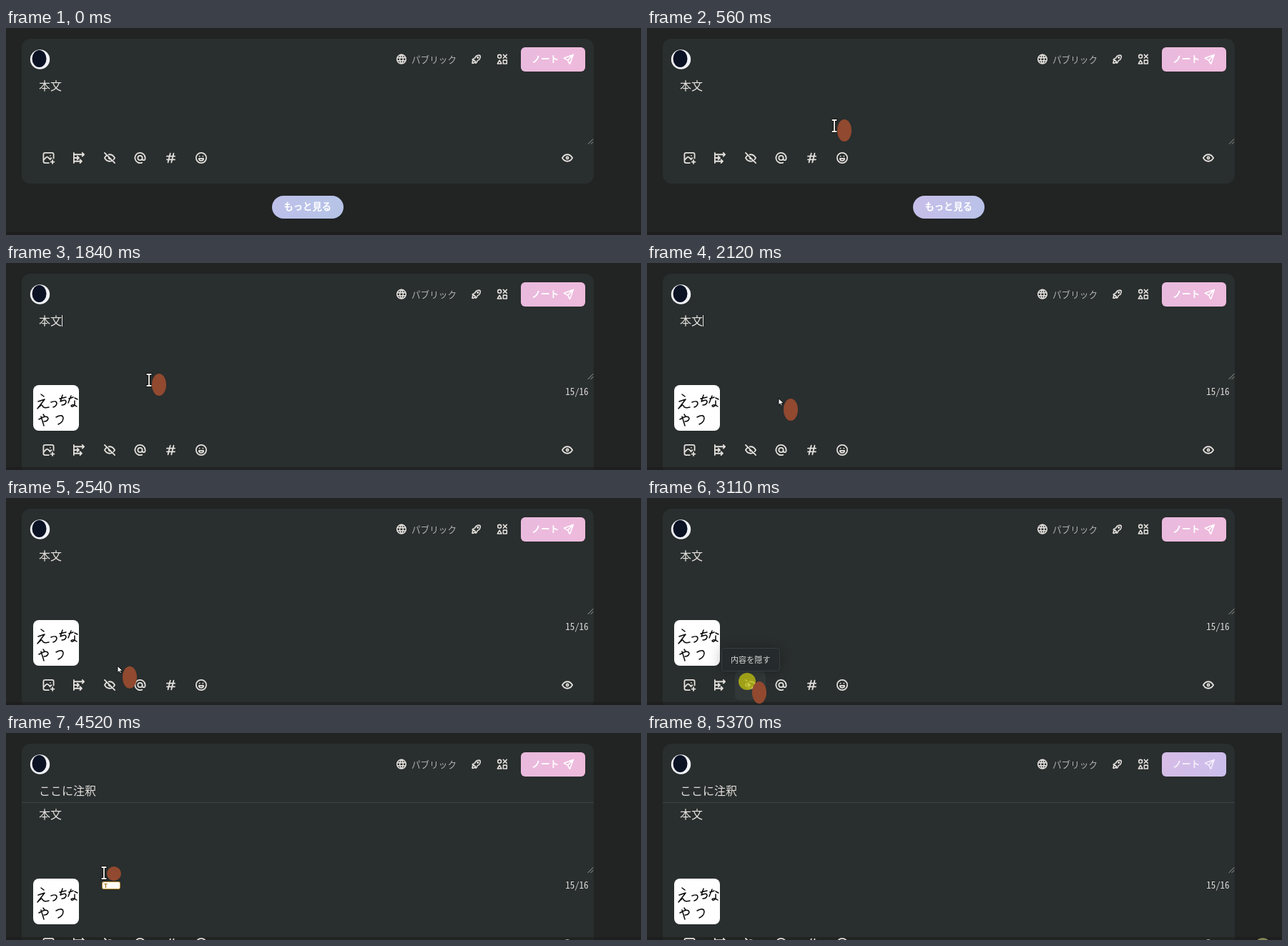
An HTML page with a canvas that plays this animation: 888x290 px, repeating every 5510 ms.

```html
<!DOCTYPE html>
<html lang="ja">
<head>
<meta charset="utf-8">
<title>投稿フォーム</title>
<style>
html, body { margin: 0; width: 888px; height: 290px; overflow: hidden; background: #212423; }
canvas { display: block; }
</style>
</head>
<body>
<canvas id="stage" width="888" height="290"></canvas>
<script>
const ctx = document.getElementById('stage').getContext('2d');
const LOOP = 5510, STEPS = 39;
const SANS = '"Noto Sans CJK JP", "Noto Sans CJK", "Noto Sans", sans-serif';
const MONO = '"Noto Sans Mono CJK JP", "Noto Sans CJK JP", "Noto Sans Mono", monospace';
const INK = '#e4e1dd';

// Steps at which the form changes
const FOCUS = 5, ATTACH = 12, BLUR = 19, HOVER = 20, CLICK = 22, WARN = 23;

// Pointer keys: step, x, y
const route = [
  [1, 680, 292], [2, 619, 235], [3, 410, 165], [4, 262, 128], [5, 219, 118],
  [11, 219, 118], [13, 200, 155], [15, 184, 190], [17, 164, 225], [20, 140, 257],
  [28, 140, 257], [30, 137, 222], [32, 137, 187], [33, 140, 190], [34, 300, 208],
  [35, 590, 238], [36, 750, 250], [37, 852, 284], [38, 861, 299]
];

const mix = (a, b, k) => a + (b - a) * k;
const clamp = v => Math.max(0, Math.min(1, v));
const rgb = (a, b, k) => `rgb(${a.map((v, i) => Math.round(mix(v, b[i], k)))})`;

function box(x, y, w, h, r, fill, stroke) {
  ctx.beginPath();
  ctx.roundRect(x, y, w, h, r);
  if (fill) { ctx.fillStyle = fill; ctx.fill(); }
  if (stroke) { ctx.strokeStyle = stroke; ctx.lineWidth = 1; ctx.stroke(); }
}

function disc(x, y, r, fill) {
  ctx.beginPath();
  ctx.arc(x, y, r, 0, Math.PI * 2);
  ctx.fillStyle = fill;
  ctx.fill();
}

function label(str, x, y, size, color = INK, weight = 500, family = SANS) {
  ctx.font = `${weight} ${size}px ${family}`;
  ctx.textBaseline = 'alphabetic';
  ctx.fillStyle = color;
  ctx.fillText(str, x, y);
}

function icon(d, x, y, scale, color = INK) {
  ctx.save();
  ctx.translate(x, y);
  ctx.scale(scale, scale);
  ctx.translate(-12, -12);
  ctx.lineWidth = 2.25;
  ctx.lineCap = ctx.lineJoin = 'round';
  ctx.strokeStyle = color;
  ctx.stroke(new Path2D(d));
  ctx.restore();
}

function button(x, y, w, h, r, left, right) {
  const g = ctx.createLinearGradient(x, y, x + w, y + h);
  g.addColorStop(0, left);
  g.addColorStop(1, right);
  box(x, y, w, h, r, g);
}

const RING = 'M3 12a9 9 0 1 0 18 0a9 9 0 1 0 -18 0';

function header(step) {
  disc(47.5, 44, 13.7, '#f1f3f8');
  ctx.beginPath();
  ctx.ellipse(46.5, 43, 10, 12, 0, 0, Math.PI * 2);
  ctx.fillStyle = '#0b1224';
  ctx.fill();

  icon(RING + 'M3.6 9h16.8M3.6 15h16.8M11.5 3a17 17 0 0 0 0 18M12.5 3a17 17 0 0 1 0 18', 553, 43.7, .7);
  label('パブリック', 567, 48.5, 12.6, '#b0b2b0');
  icon('M4 13a8 8 0 0 1 7 7a6 6 0 0 0 3 -5a9 9 0 0 0 6 -8a3 3 0 0 0 -3 -3a9 9 0 0 0 -8 6a6 6 0 0 0 -5 3' +
    'M7 14a6 6 0 0 0 -3 6a6 6 0 0 0 6 -3M14 9a1 1 0 1 0 2 0a1 1 0 1 0 -2 0', 657.7, 43.7, .7);
  icon('M3 6.5a3.5 3.5 0 1 0 7 0a3.5 3.5 0 1 0 -7 0M2.5 21h8l-4 -7zM14 3l7 7M14 10l7 -7M14 14h7v7h-7z', 694, 43.7, .7);

  const k = clamp((step - 32) / 6);
  button(720, 27, 90, 34, 6, rgb([233, 186, 222], [215, 188, 230], k), rgb([239, 186, 220], [202, 190, 236], k));
  const ink = `rgba(255,255,255,${mix(1, .75, k)})`;
  label('ノート', 735, 48.2, 12.8, ink, 700);
  icon('M10 14l11 -11M21 3l-6.5 18a.55 .55 0 0 1 -1 0l-3.5 -7l-7 -3.5a.55 .55 0 0 1 0 -1l18 -6.5', 787, 43.7, .7, ink);
}

function toolbar(y) {
  const s = .79;
  icon('M15 8h.01M12.5 21h-6.5a3 3 0 0 1 -3 -3v-12a3 3 0 0 1 3 -3h12a3 3 0 0 1 3 3v6.5' +
    'M3 16l5 -5c.9 -.9 2.1 -.9 3 0l4 4M14 14l1 -1c.7 -.6 1.4 -.8 2.2 -.5M16 19h6M19 16v6', 59.5, y, s);
  icon('M3 18h14M9 9l3 3l-3 3M14 15l3 3l-3 3M3 3v18M3 12h9M18 3l3 3l-3 3M3 6h18', 102, y, s);
  icon('M10.6 10.6a2 2 0 0 0 2.8 2.8M16.7 16.7a8.7 8.7 0 0 1 -4.7 1.3c-3.6 0 -6.6 -2 -9 -6c1.3 -2.1 2.7 -3.7 4.3 -4.7' +
    'm2.9 -1.1a9 9 0 0 1 1.8 -.2c3.6 0 6.6 2 9 6c-.7 1.1 -1.4 2 -2.1 2.9M3 3l18 18', 145, y, s);
  icon('M8 12a4 4 0 1 0 8 0a4 4 0 1 0 -8 0M16 12v1.5a2.5 2.5 0 0 0 5 0v-1.5a9 9 0 1 0 -5.5 8.3', 187.5, y, s);
  icon('M5 9h14M5 15h14M11 4l-4 16M17 4l-4 16', 230.5, y, s);
  icon(RING + 'M9 9h.01M15 9h.01M8 13a4 4 0 1 0 8 0h-8', 273, y, s);
  icon('M10 12a2 2 0 1 0 4 0a2 2 0 0 0 -4 0M21 12c-2.4 4 -5.4 6 -9 6c-3.6 0 -6.6 -2 -9 -6c2.4 -4 5.4 -6 9 -6c3.6 0 6.6 2 9 6', 785, y, s);
}

// Handwritten memo
const strokes = [
  'M11 13l4 3M7 23l9 -3l-10 13q6 -7 7 -4q1 4 9 2',
  'M25 24q8 -3 8 2q-1 4 -5 5',
  'M37 19l9 -2M41 14l-3 9q8 -4 8 1q-1 4 -6 4',
  'M50 19l6 -2M53 15l-4 10M58 18l4 2M58 22v6q-4 4 -5 1q2 -3 8 1',
  'M8 48q12 -7 13 -1q-1 4 -6 4M14 41l2 3M11 44l4 13',
  'M32 45q9 -5 10 1q0 6 -7 9'
].map(d => new Path2D(d));

function thumb(y) {
  box(38, y, 64, 64, 8, '#fff');
  ctx.save();
  ctx.translate(38, y);
  ctx.strokeStyle = '#080808';
  ctx.lineWidth = 1.5;
  ctx.lineCap = ctx.lineJoin = 'round';
  strokes.forEach(p => ctx.stroke(p));
  ctx.restore();
  ctx.textAlign = 'right';
  label('15/16', 814.5, y + 13.5, 12.9, '#e0dedb', 500, MONO);
  ctx.textAlign = 'left';
}

function grip(y) {
  ctx.strokeStyle = '#a0a2a1';
  ctx.lineWidth = 1;
  ctx.beginPath();
  ctx.moveTo(814, y + 7); ctx.lineTo(821, y);
  ctx.moveTo(818, y + 7); ctx.lineTo(821, y + 4);
  ctx.stroke();
}

function tooltip() {
  ctx.save();
  ctx.shadowColor = 'rgba(0,0,0,.3)';
  ctx.shadowBlur = 18;
  box(104.5, 210.5, 81, 32, 4, '#252b2d');
  ctx.restore();
  box(104.5, 210.5, 81, 32, 4, null, '#363d3f');
  label('内容を隠す', 117, 230.5, 11.1, '#d8d9d8');
}

function pointerAt(step) {
  const i = route.findIndex(p => p[0] >= step);
  if (i < 0 || step < route[0][0]) return null;
  if (i === 0) return { x: route[0][1], y: route[0][2] };
  const [a, ax, ay] = route[i - 1], [b, bx, by] = route[i];
  const k = (step - a) / (b - a);
  return { x: mix(ax, bx, k), y: mix(ay, by, k) };
}

function beam(x, y) {
  const p = new Path2D(`M${x - 2.5} ${y + 1}h5M${x} ${y + 1}v16M${x - 2.5} ${y + 17}h5`);
  ctx.lineCap = 'square';
  for (const [w, c] of [[3.8, '#111'], [1.8, '#f4f1ea']]) {
    ctx.lineWidth = w;
    ctx.strokeStyle = c;
    ctx.stroke(p);
  }
}

function arrow(x, y) {
  const p = new Path2D(`M${x} ${y}v9l2.2 -2l1.6 3.2l1.6 -.8l-1.5 -3h3z`);
  ctx.lineWidth = 1;
  ctx.lineJoin = 'miter';
  ctx.fillStyle = '#fff';
  ctx.strokeStyle = '#111';
  ctx.fill(p);
  ctx.stroke(p);
}

function companion(x, y, sign) {
  ctx.beginPath();
  ctx.ellipse(x, y + (sign ? 10 : 15.5), 10, sign ? 10 : 15.5, 0, 0, Math.PI * 2);
  ctx.fillStyle = '#91492f';
  ctx.fill();
  if (sign) {
    box(x - 16.5, y + 21.5, 25, 10, 2, '#fff', '#b98a2c');
    label('T', x - 14, y + 30, 8, '#a87512', 700);
  }
}

function pointer(step, areaBottom) {
  const p = pointerAt(step);
  if (!p) return;
  const text = p.x < 822 && p.y > 66 && p.y < areaBottom;
  const sign = text && step > 28;
  if (text) beam(p.x, p.y); else arrow(p.x, p.y);
  if (step === FOCUS) disc(p.x, p.y + 8, 12, 'rgba(190,190,15,.75)');
  if (step === CLICK) disc(p.x, p.y, 12, 'rgba(190,190,15,.78)');
  if (step === 38) disc(p.x, p.y, 12, 'rgba(190,190,120,.65)');
  companion(p.x + (text ? 14 : 17), p.y, sign);
}

function draw(step) {
  const attached = step >= ATTACH, warned = step >= WARN;
  const drop = warned ? 33 : 0;
  const barY = 182 + (attached ? 80 : 0) + drop;

  ctx.fillStyle = '#212423';
  ctx.fillRect(0, 0, 888, 290);

  if (!attached) {
    const k = clamp(step / 9);
    button(372, 235, 100, 32, 16, rgb([190, 192, 233], [210, 188, 233], k), rgb([181, 196, 231], [190, 192, 234], k));
    label('もっと見る', 388.5, 255.2, 13.3, '#fff', 700);
  }

  box(22, 15, 800, barY + 21, 12, '#292e2e');
  ctx.fillStyle = 'rgba(24,22,22,.4)';
  ctx.fillRect(0, 286, 888, 4);
  header(step);

  if (warned) {
    label('ここに注釈', 46, 87, 16);
    ctx.fillStyle = '#3d4342';
    ctx.fillRect(22, 97, 800, 1);
  }
  label('本文', 46, 87 + drop, 16);

  const blink = Math.floor((step - FOCUS) / 3.54) % 2 === 0;
  if (step >= FOCUS && step < BLUR && blink) {
    ctx.fillStyle = '#e4e4e4';
    ctx.fillRect(78, 73, 1, 16);
  }

  grip(155.5 + drop);
  if (attached) thumb(171 + drop);

  const hover = step >= HOVER && step < WARN;
  if (hover) box(123, 243, 43, 40, 6, '#323838');
  toolbar(barY);
  if (hover) tooltip();
  pointer(step, 163 + (warned ? 41 : 0));
}

function tick(now) {
  const t = now % LOOP;
  draw(Math.min(STEPS - 1, Math.floor((t + 5) * STEPS / LOOP)));
  requestAnimationFrame(tick);
}
draw(0);
requestAnimationFrame(tick);
</script>
</body>
</html>
```
